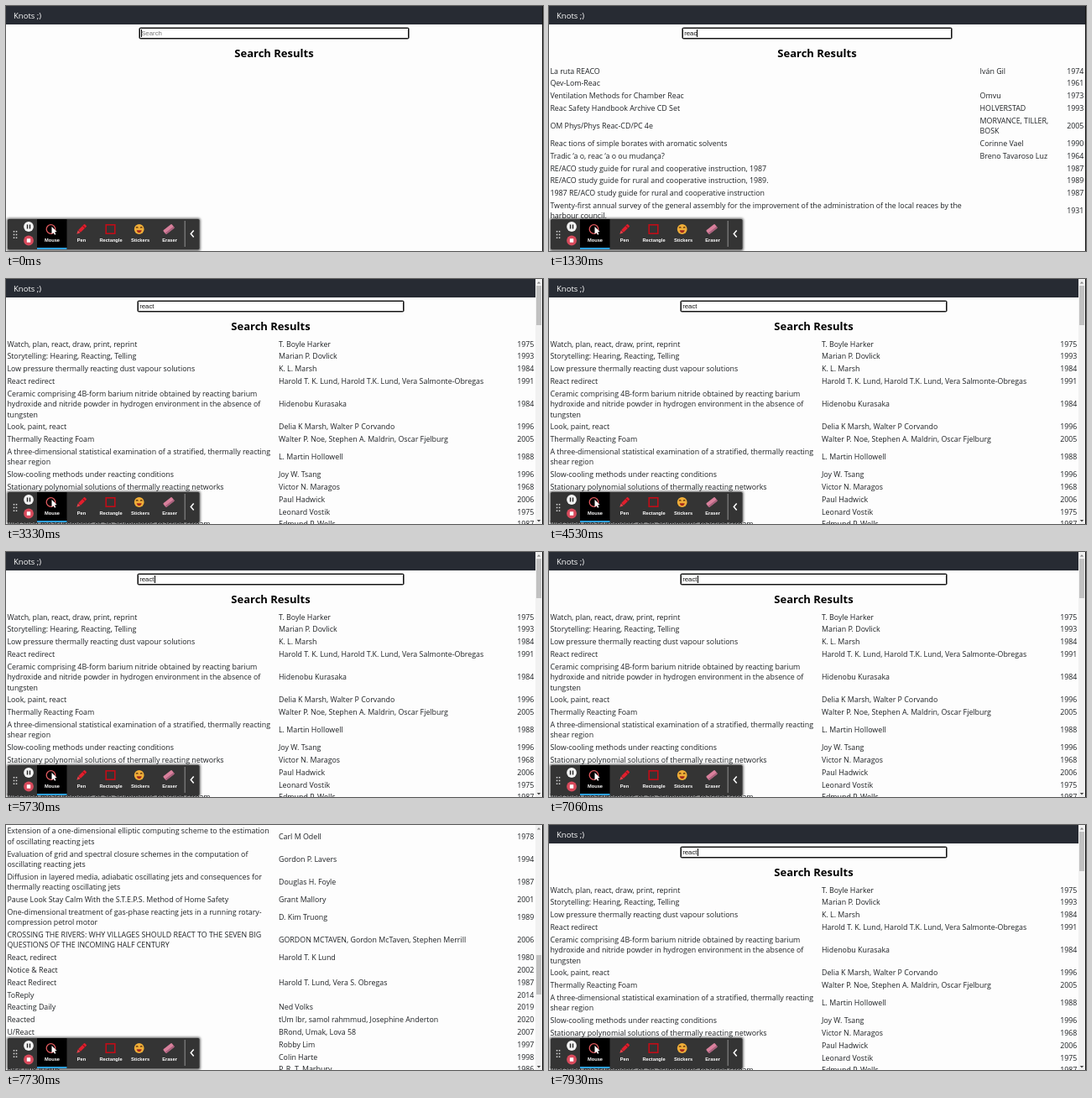
Write an HTML page that moves like this. It is 640 px wide and 292 px high and loops after 8000 ms.

```html
<!DOCTYPE html>
<html lang="en">
<head>
<meta charset="utf-8">
<title>Search demo</title>
<style>
html, body { margin: 0; width: 100%; height: 100%; overflow: hidden; background: #fdfdfd; }
#stage { position: absolute; left: 0; top: 0; width: 640px; height: 292px; overflow: hidden; background: #fdfdfd;
  font: 8.85px/12.4px "Open Sans", "Noto Sans", sans-serif; color: #1e2124; --page: 639px; }
#stage.long { --page: 631px; }
#view { position: absolute; left: 0; top: 0; width: var(--page); height: 292px; overflow: hidden; }
#page { position: absolute; left: 0; top: 0; width: 100%; height: 1715px; will-change: transform; }
header { height: 22px; background: #272b33; color: #fff; font-size: 9.5px; line-height: 23px; padding-left: 9px; }
#box { position: absolute; left: calc(25% - .8px); top: 26px; width: calc(50% + 1.6px); height: 13px; box-sizing: border-box;
  border: 1px solid #111; border-radius: 1.5px; box-shadow: 0 0 0 .6px #222; background: #fff; padding-left: 1.2px;
  font: 7.84px/11px "Liberation Sans", Arial, sans-serif; white-space: pre; color: #111; }
#caret { display: inline-block; width: .7px; height: 9px; margin-right: -.7px; background: #000; vertical-align: -1.6px; }
#hint { color: #777; }
h2 { position: absolute; margin: 0; left: 0; width: 100%; top: 47px; text-align: center; color: #000;
  font-size: 13px; line-height: 18px; }
.list { position: absolute; left: 0; width: 100%; overflow: hidden; }
.row { position: relative; display: flex; align-items: center; white-space: pre; }
.row span { position: absolute; left: 1.4px; margin-top: .6px; }
.row .who { left: 325px; }
#short .who { left: 513.6px; }
.row .year { left: auto; right: 1.6px; }
#bar { position: absolute; left: 631px; top: 0; width: 8px; height: 292px; background: #f1f1f1; }
#thumb { position: absolute; left: 1px; top: 8px; width: 6px; height: 47px; background: #c1c1c1; }
#bar svg { position: absolute; left: 0; top: 0; }
#edge { position: absolute; left: 639px; top: 0; width: 1px; height: 292px; background: #111; }
#tools { position: absolute; left: 0; top: 244px; }
#tools text { font: bold 5.7px "Liberation Sans", Arial, sans-serif; fill: #fff; text-anchor: middle; }
</style>
</head>
<body>
<div id="stage">
  <div id="view"><div id="page">
    <header>Knots ;)</header>
    <div id="box"><span id="typed"></span><i id="caret"></i><span id="hint">Search</span></div>
    <h2>Search Results</h2>
    <div class="list" id="short" style="top:70.1px"></div>
    <div id="long">
      <div class="list" id="first" style="top:70.1px"></div>
      <div class="list" id="middle" style="top:299.7px;height:613.3px"></div>
      <div class="list" id="later" style="top:913px"></div>
      <div class="list" id="last" style="top:1211.8px;height:503px"></div>
    </div>
  </div></div>
  <div id="bar">
    <div id="thumb"></div>
    <svg width="8" height="292"><path d="M1.8 5.5 4 3l2.2 2.5z" fill="#888"/><path d="M1.8 287 4 289.5l2.2-2.5z" fill="#444"/></svg>
  </div>
  <div id="edge"></div>
  <svg id="tools" width="240" height="48" viewBox="0 244 240 48">
    <defs><filter id="soft" x="-10%" y="-30%" width="120%" height="160%"><feGaussianBlur stdDeviation="1.8"/></filter></defs>
    <rect x="1" y="253" width="230.5" height="39" rx="2" fill="#000" opacity=".65" filter="url(#soft)"/>
    <rect x="2" y="254" width="228.5" height="36" rx="1.5" fill="#343434"/>
    <rect x="37" y="254" width="35.5" height="36" fill="#000"/>
    <rect x="37" y="288" width="35.5" height="2" fill="#2da0e0"/>
    <path d="M9.5 268v9M12.500 268v9" stroke="#ddd" stroke-width="1.5" stroke-dasharray="1.5 2.2"/>
    <circle cx="27" cy="263" r="5.9" fill="#f4f4f4"/>
    <path d="M25.5 260.5v5M28.5 260.5v5" stroke="#222" stroke-width="1.4"/>
    <circle cx="27" cy="279.5" r="5.9" fill="#d84a5c"/>
    <rect x="24.8" y="277.3" width="4.4" height="4.4" rx=".5" fill="#fff"/>
    <circle cx="53.5" cy="266" r="5.3" fill="none" stroke="#e05a5e" stroke-width="1.3"/>
    <path d="M54.5 263v9l2-1.9 1.5 2.7 1.4-.7-1.4-2.7 2.6-.3z" fill="#fff"/>
    <g transform="rotate(45 90 266)">
      <rect x="88" y="259" width="4" height="10.5" rx=".8" fill="#e01f2d"/>
      <path d="M88 270h4l-2 4z" fill="#f0404a"/><path d="M88 262h4" stroke="#8f1018"/>
    </g>
    <rect x="119.2" y="260.8" width="10.6" height="10.4" fill="none" stroke="#c00d18" stroke-width="1.6"/>
    <circle cx="158.7" cy="266" r="5.9" fill="#f0ae38"/>
    <path d="M155 264.5q1.2-1.7 2.4 0M160 264.5q1.2-1.7 2.4 0" fill="none" stroke="#5b3210" stroke-width="1.1"/>
    <path d="M155.700 267.300h6q-.6 3-3 3t-3-3z" fill="#a3281c"/>
    <g transform="rotate(-38 194 266)">
      <rect x="187.5" y="263" width="13" height="6" rx="1" fill="#d9809c"/><rect x="187.5" y="267" width="13" height="2" rx=".8" fill="#a8607c"/>
    </g>
    <path d="M213.2 256v31" stroke="#aaa" stroke-width=".8"/>
    <path d="M223.7 267.5l-3.4 4 3.4 4" fill="none" stroke="#fff" stroke-width="1.5"/>
    <text x="55" y="281">Mouse</text><text x="90" y="281">Pen</text><text x="125" y="281">Rectangle</text>
    <text x="160" y="281">Stickers</text><text x="195" y="281">Eraser</text>
  </svg>
</div>
<script>
const $ = id => document.getElementById(id);

// One result per line: title | authors | year, with " / " breaking a cell onto a new line.
const parse = text => text.trim().split("\n").map(line =>
  line.split("|").map(cell => cell.replaceAll(" / ", "\n")));

const shortRows = parse(`
La ruta REACO|Iván Gil|1974
Qev-Lom-Reac||1961
Ventilation Methods for Chamber Reac|Omvu|1973
Reac Safety Handbook Archive CD Set|HOLVERSTAD|1993
OM Phys/Phys Reac-CD/PC 4e|MORVANCE, TILLER, / BOSK|2005
Reac tions of simple borates with aromatic solvents|Corinne Vael|1990
Tradic ‘a o, reac ‘a o ou mudança?|Breno Tavaroso Luz|1964
RE/ACO study guide for rural and cooperative instruction, 1987||1987
RE/ACO study guide for rural and cooperative instruction, 1989.||1989
1987 RE/ACO study guide for rural and cooperative instruction||1987
Twenty-first annual survey of the general assembly for the improvement of the administration of the local reaces by the / harbour council.||1931`);

const firstRows = parse(`
Watch, plan, react, draw, print, reprint|T. Boyle Harker|1975
Storytelling: Hearing, Reacting, Telling|Marian P. Dovlick|1993
Low pressure thermally reacting dust vapour solutions|K. L. Marsh|1984
React redirect|Harold T. K. Lund, Harold T.K. Lund, Vera Salmonte-Obregas|1991
Ceramic comprising 4B-form barium nitride obtained by reacting barium / hydroxide and nitride powder in hydrogen environment in the absence of / tungsten|Hidenobu Kurasaka|1984
Look, paint, react|Delia K Marsh, Walter P Corvando|1996
Thermally Reacting Foam|Walter P. Noe, Stephen A. Maldrin, Oscar Fjelburg|2005
A three-dimensional statistical examination of a stratified, thermally reacting / shear region|L. Martin Hollowell|1988
Slow-cooling methods under reacting conditions|Joy W. Tsang|1996
Stationary polynomial solutions of thermally reacting networks|Victor N. Maragos|1968
Learning to react|Paul Hadwick|2006
How we react|Leonard Vostik|1975
Vibration measurements of an asymmetric reacting stream|Edmund P. Wells|1987`);

const laterRows = parse(`
Extension of a one-dimensional elliptic computing scheme to the estimation / of oscillating reacting jets|Carl M Odell|1978
Evaluation of grid and spectral closure schemes in the computation of / oscillating reacting jets|Gordon P. Lavers|1994
Diffusion in layered media, adiabatic oscillating jets and consequences for / thermally reacting oscillating jets|Douglas H. Foyle|1987
Pause Look Stay Calm With the S.T.E.P.S. Method of Home Safety|Grant Mallory|2001
One-dimensional treatment of gas-phase reacting jets in a running rotary- / compression petrol motor|D. Kim Truong|1989
CROSSING THE RIVERS: WHY VILLAGES SHOULD REACT TO THE SEVEN BIG / QUESTIONS OF THE INCOMING HALF CENTURY|GORDON MCTAVEN, Gordon McTaven, Stephen Merrill|2006
React, redirect|Harold T. K Lund|1980
Notice & React||2002
React Redirect|Harold T. Lund, Vera S. Obregas|1987
ToReply||2014
Reacting Daily|Ned Volks|2019
Reacted|tUm lbr, samol rahmmud, Josephine Anderton|2020
U/React|BRond, Umak, Lova 58|2007
React!|Robby Lim|1997
Reacting|Colin Harte|1998
Reacting foams|P. R. T. Marbury|1986`);

function fill(id, rows) {
  for (const cells of rows) {
    const row = document.createElement("div");
    const lines = Math.max(...cells.map(cell => cell.split("\n").length));
    row.className = "row";
    row.style.height = lines * 12.4 + 2.4 + "px";
    ["what", "who", "year"].forEach((name, i) => {
      const span = document.createElement("span");
      span.className = name;
      span.textContent = cells[i];
      row.append(span);
    });
    $(id).append(row);
  }
}
const filler = [...firstRows.slice(5), ...laterRows.slice(0, 5), ...firstRows];
fill("short", shortRows);
fill("first", firstRows);
fill("middle", [...filler, ...filler]);
fill("later", laterRows);
fill("last", [...filler, ...filler]);

const LOOP = 8000, RESULTS = 1200, MORE_RESULTS = 1660;
const keyTimes = [200, 400, 660, 860, 1660];
const scrollKeys = [[7130, 0], [7600, 913], [7800, 913], [7920, 0]];

function scrollAt(t) {
  for (let i = 1; i < scrollKeys.length; i++) {
    const [t0, y0] = scrollKeys[i - 1], [t1, y1] = scrollKeys[i];
    if (t >= t0 && t < t1) {
      const p = (t - t0) / (t1 - t0);
      return y0 + (y1 - y0) * p * p * (3 - 2 * p);
    }
  }
  return 0;
}

function render(now) {
  const t = now % LOOP;
  const typed = keyTimes.filter(k => t >= k).length;
  const long = t >= MORE_RESULTS;
  const scroll = scrollAt(t);
  const sinceKey = t - (typed ? keyTimes[typed - 1] : 0);
  $("typed").textContent = "react".slice(0, typed);
  $("hint").hidden = typed > 0;
  $("caret").style.opacity = sinceKey % 1000 < 500 ? 1 : 0;
  $("stage").className = long ? "long" : "";
  $("short").hidden = long || t < RESULTS;
  $("long").hidden = $("bar").hidden = !long;
  $("page").style.transform = `translateY(${-scroll}px)`;
  $("thumb").style.top = 8 + scroll * 147 / 913 + "px";
}

const start = performance.now();
function tick() {
  render(performance.now() - start);
  requestAnimationFrame(tick);
}
tick();
</script>
</body>
</html>
```
